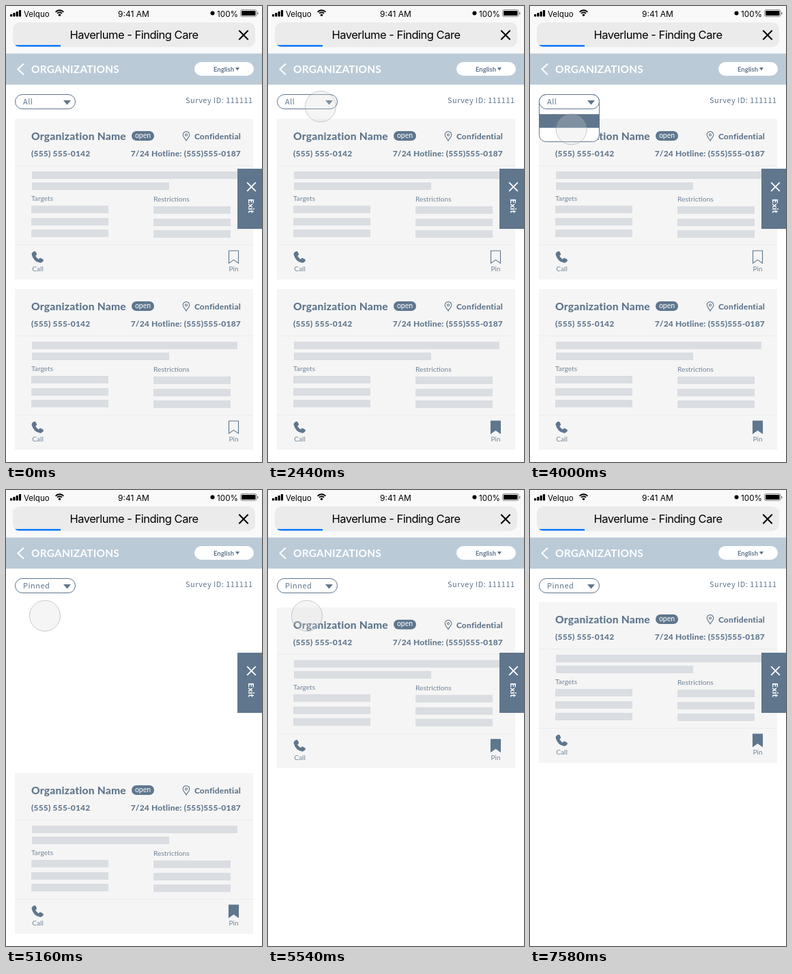
These frames come from a looping animation (375 px wide and 667 px high, 8080 ms). An HTML page with a canvas:

```html
<!DOCTYPE html>
<html lang="en">
<head>
<meta charset="utf-8">
<title>Pinned organizations</title>
<style>
  html, body { margin: 0; width: 100%; height: 100%; overflow: hidden; background: #fff; }
  canvas { display: block; width: 375px; height: 667px; }
</style>
</head>
<body>
<canvas id="stage"></canvas>
<script>
const W = 375, H = 667, LOOP = 8080;
const SLATE = '#5f768d', SOFT = '#71869b', CARD = '#f5f5f5', BLOCK = '#dadde2';
const LATO = 'Lato, sans-serif';
const CJK = '"Noto Sans CJK SC", "Noto Sans CJK JP", "Noto Sans CJK", "Noto Sans", sans-serif';
const UI = 'Inter, sans-serif';
const SMALL = `10.2px ${LATO}`;
const STRONG = `800 12px ${LATO}`;

const canvas = document.getElementById('stage');
const ctx = canvas.getContext('2d');
const dpr = window.devicePixelRatio || 1;
canvas.width = W * dpr;
canvas.height = H * dpr;

const phoneIcon = new Path2D('M4 1Q5.5 0 6.6 1.8L8 4.4Q8.6 5.6 7.4 6.6L6.2 7.6Q8 11 10.8 12.4L12 11Q13 10 14 10.7L17.2 12.6Q18.6 13.8 17.6 15Q15.5 18 12.6 17.6Q3.5 16 .6 5.4Q.4 2.6 4 1Z');
const bookmarkIcon = new Path2D('M.5 .5H14.5V18.7L7.5 13.8L.5 18.7Z');
const placeIcon = new Path2D('M5 13.5C3.4 10 .2 8 .2 4.9A4.8 4.8 0 0 1 9.8 4.9C9.8 8 6.6 10 5 13.5ZM6.5 5A1.5 1.5 0 1 1 3.5 5A1.5 1.5 0 1 1 6.5 5Z');

// Timing
const progress = (t, from, to) => Math.min(1, Math.max(0, (t - from) / (to - from)));
const sineInOut = p => 0.5 - 0.5 * Math.cos(Math.PI * p);
const easeOut = (p, power) => 1 - (1 - p) ** power;

// Cubic bezier easing (.4, 0, .4, 1)
function smooth(p) {
  let lo = 0, hi = 1, s = p;
  for (let i = 0; i < 24; i++) {
    s = (lo + hi) / 2;
    const x = 1.2 * s * (1 - s) + s ** 3;
    if (x < p) lo = s; else hi = s;
  }
  return 3 * s * s - 2 * s ** 3;
}

const moves = [
  { start: 330, end: 1130, from: [339, -24], bend: [266, 561], to: [334, 620], ease: sineInOut },
  { start: 1770, end: 2440, from: [334, 620], bend: [-32, 72], to: [77, 147], ease: sineInOut },
  { start: 3390, end: 3740, from: [77, 147], bend: [74, 163], to: [66, 175], ease: sineInOut },
  { start: 3910, end: 4280, from: [66, 175], bend: [61, 180], to: [57, 184], ease: p => easeOut(p, 3) },
  { start: 6090, end: 6870, from: [57, 184], bend: [190, 60], to: [345, -24], ease: sineInOut },
  { start: 7125, end: 7200, from: [350, -24], bend: [350, -8], to: [350, 2], ease: p => easeOut(p, 2) }
];
const presses = [[1240, 1420], [2840, 3000], [7440, 7580]];

// Drawing helpers
function rect(x, y, w, h, color) {
  ctx.fillStyle = color;
  ctx.fillRect(x, y, w, h);
}

function rounded(x, y, w, h, r, fill, stroke) {
  ctx.beginPath();
  ctx.roundRect(x, y, w, h, r);
  if (fill) { ctx.fillStyle = fill; ctx.fill(); }
  if (stroke) { ctx.strokeStyle = stroke; ctx.lineWidth = 1; ctx.stroke(); }
}

function circle(x, y, r, fill) {
  ctx.beginPath();
  ctx.arc(x, y, r, 0, 2 * Math.PI);
  ctx.fillStyle = fill;
  ctx.fill();
}

function line(points, color, width) {
  ctx.beginPath();
  points.forEach(([x, y]) => ctx.lineTo(x, y));
  ctx.strokeStyle = color;
  ctx.lineWidth = width;
  ctx.stroke();
}

function cross(x, y, r, color, width) {
  line([[x - r, y - r], [x + r, y + r]], color, width);
  line([[x - r, y + r], [x + r, y - r]], color, width);
}

function caret(x, y, w, h) {
  ctx.beginPath();
  ctx.moveTo(x, y);
  ctx.lineTo(x + w, y);
  ctx.lineTo(x + w / 2, y + h);
  ctx.fillStyle = SLATE;
  ctx.fill();
}

function text(str, x, y, font, color = SLATE, align = 'left', spacing = 0) {
  ctx.font = font;
  ctx.letterSpacing = spacing + 'px';
  ctx.textAlign = align;
  ctx.fillStyle = color;
  ctx.fillText(str, x, y);
}

function icon(path, x, y, filled) {
  ctx.save();
  ctx.translate(x, y);
  ctx.fillStyle = ctx.strokeStyle = SLATE;
  ctx.lineWidth = 1.1;
  if (filled) ctx.fill(path);
  else ctx.stroke(path);
  ctx.restore();
}

// Screen parts
function drawStatus() {
  rect(0, 0, W, 70, '#f9f9f9');
  for (let i = 0; i < 4; i++) rounded(6 + i * 4.3, 12 - i * 2, 3.2, 3.5 + i * 2, 0.8, '#000');
  text('Velquo', 26, 15.5, `11.5px ${UI}`, '#000');
  ctx.strokeStyle = '#000';
  ctx.lineWidth = 1.9;
  for (const r of [4.6, 7.8]) {
    ctx.beginPath();
    ctx.arc(78.5, 14, r, -Math.PI * 0.77, -Math.PI * 0.23);
    ctx.stroke();
  }
  circle(78.5, 13.2, 1.7, '#000');
  text('9:41 AM', 187, 15.5, `12px ${UI}`, '#000', 'center');
  circle(302.5, 10.5, 3, '#000');
  text('100%', 340, 15.5, `11.7px ${UI}`, '#000', 'right');
  rounded(343.5, 5.5, 23.5, 10, 2.5, null, 'rgba(0,0,0,.45)');
  rounded(345, 7, 20.5, 7, 1, '#000');
  rounded(368, 9, 1.5, 3.5, 0.7, 'rgba(0,0,0,.5)');
}

function drawAddressBar() {
  rounded(10, 24, 355, 36, 10, '#ebebeb');
  ctx.save();
  ctx.clip();
  rect(10, 57, 70, 2.5, '#0a7aff');
  ctx.restore();
  text('Haverlume - Finding Care', 187.5, 48, `16.5px ${UI}`, '#000', 'center', -0.5);
  cross(348, 42.5, 6.7, '#000', 2);
}

function drawHeader() {
  rect(0, 69.5, W, 45.5, '#bbcad7');
  line([[26, 84.5], [17.5, 92.5], [26, 100.5]], '#fff', 2);
  text('ORGANIZATIONS', 37, 97.5, `bold 15.4px ${LATO}`, '#fff', 'left', 0.25);
  rounded(276, 82, 87, 20, 10, '#fff');
  text('English', 304, 95.5, `bold 9.5px ${LATO}`);
  caret(336, 90, 6, 4.5);
  text('Survey ID: 111111', 361.5, 142, `500 11px ${CJK}`, SLATE, 'right', 0.45);
}

function drawCard(top, pinned) {
  ctx.save();
  ctx.translate(0, top);
  rect(13, 0, 349, 235, CARD);

  text('Organization Name', 37, 31, `800 15.6px ${LATO}`, SLATE, 'left', 0.2);
  rounded(184, 18, 33, 14, 7, SLATE);
  text('open', 200.5, 27.5, `10.5px ${LATO}`, '#fff', 'center');
  icon(placeIcon, 259, 18.5);
  text('Confidential', 344, 30, STRONG, SLATE, 'right', 0.2);
  text('(555) 555-0142', 37, 55, STRONG, SLATE, 'left', 0.2);
  text('7/24 Hotline: (555)555-0187', 344, 55, STRONG, SLATE, 'right', 0.2);

  rect(13, 68, 349, 1, '#ebecee');
  rect(38, 77, 301, 11, BLOCK);
  rect(38, 93, 201, 11, BLOCK);
  text('Targets', 37, 120, SMALL, SOFT);
  text('Restrictions', 216, 121, SMALL, SOFT);
  for (const y of [127, 145, 162]) {
    rect(37, y, 113, 11, BLOCK);
    rect(216, y + 1, 113, 11, BLOCK);
  }

  rect(13, 184, 349, 1, '#ebecee');
  icon(phoneIcon, 37, 193, true);
  text('Call', 46.5, 223, SMALL, SOFT, 'center');
  icon(bookmarkIcon, 326, 192.5);
  if (pinned) icon(bookmarkIcon, 326, 192.5, true);
  text('Pin', 333.5, 223, SMALL, SOFT, 'center');
  ctx.restore();
}

function drawMenu(t) {
  const slide = easeOut(progress(t, 3910, 4280), 1.6);
  const active = t < 3400 ? -1 : t < 3920 ? 0 : 1;
  rounded(13.5, 129.5, 88, 69, 10, '#fff');
  ctx.globalAlpha = sineInOut(progress(t, 3390, 3740));
  rect(13, 151 + 20 * slide, 89, 20, SLATE);
  ctx.globalAlpha = 1;
  ['All', 'Pinned'].forEach((label, i) =>
    text(label, 25, 167 + i * 20, `500 11px ${CJK}`, i === active ? '#fff' : SLATE, 'left', 0.5));
  rounded(13.5, 129.5, 88, 69, 10, null, SLATE);
}

function drawFilter(label) {
  rounded(13.5, 129.5, 88, 21, 10.5, '#fff', SLATE);
  text(label, 25, 144, `500 11px ${CJK}`, SLATE, 'left', 0.5);
  caret(84, 138, 11, 6.5);
}

function drawExit() {
  rect(339, 238, 36, 88, SLATE);
  cross(359.5, 264.5, 6.3, '#fff', 1.8);
  ctx.save();
  ctx.translate(354.5, 282);
  ctx.rotate(Math.PI / 2);
  text('Exit', 0, 0, `800 12px ${LATO}`, '#fff');
  ctx.restore();
}

function drawCursor(t) {
  const move = moves.filter(m => t >= m.start).pop();
  if (!move || t >= 7580) return;
  const s = move.ease(progress(t, move.start, move.end));
  const [x, y] = [0, 1].map(i =>
    (1 - s) ** 2 * move.from[i] + 2 * s * (1 - s) * move.bend[i] + s * s * move.to[i]);
  const pressed = presses.some(([down, up]) => t >= down && t < up);
  circle(x, y, 22.5, `rgba(216,216,216,${pressed ? 0.55 : 0.26})`);
  ctx.strokeStyle = 'rgba(130,130,130,.4)';
  ctx.lineWidth = 1;
  ctx.stroke();
}

function draw(t) {
  const filtered = t >= 5160;
  ctx.setTransform(dpr, 0, 0, dpr, 0, 0);
  rect(0, 0, W, H, '#fff');
  drawStatus();
  drawAddressBar();
  drawHeader();
  if (!filtered) drawCard(165, false);
  drawCard(414 - 250 * smooth(progress(t, 5172, 5616)), t >= 1420);
  if (t >= 3000 && !filtered) drawMenu(t);
  drawFilter(filtered ? 'Pinned' : 'All');
  drawExit();
  drawCursor(t);
}

let origin;
function tick(now) {
  origin ??= now;
  draw((now - origin) % LOOP);
  requestAnimationFrame(tick);
}
draw(0);
requestAnimationFrame(tick);
</script>
</body>
</html>
```
